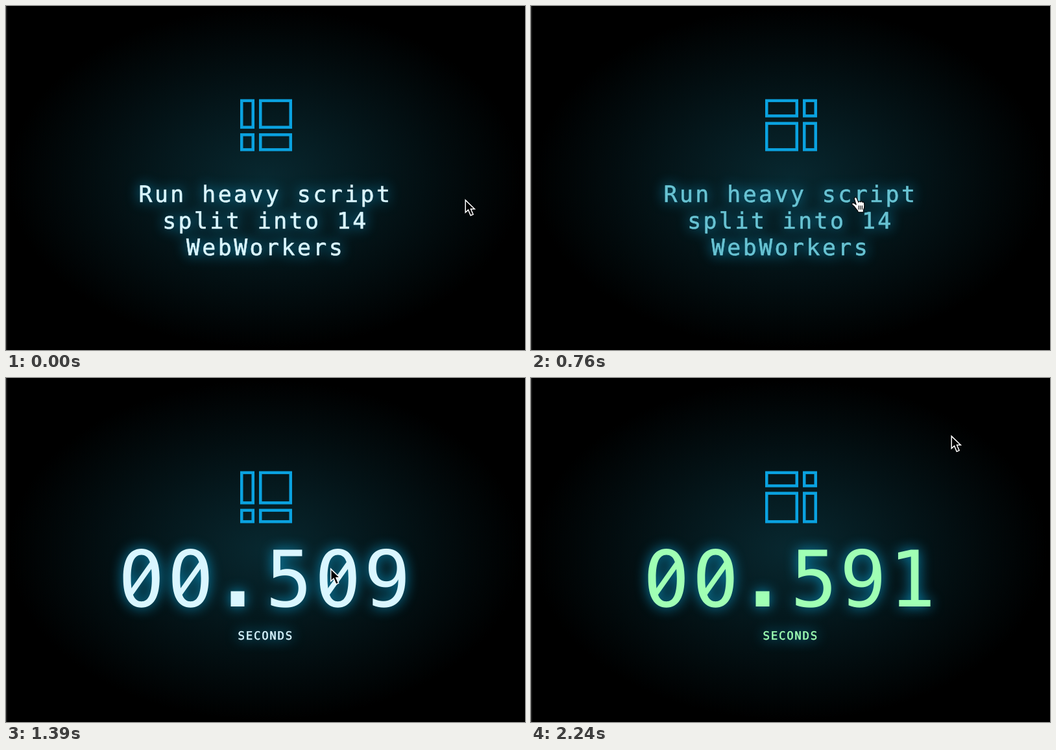
An HTML page for the animation above (2.27 s loop, 800x530 px).

```html
<!DOCTYPE html>
<html lang="en">
<head>
<meta charset="utf-8">
<title>Worker timer</title>
<style>
  html, body { margin: 0; width: 100%; height: 100%; overflow: hidden; background: #000; }
  svg { position: absolute; left: 0; top: 0; display: block; }
  #stage {
    position: relative; width: 800px; height: 530px; overflow: hidden;
    background: radial-gradient(ellipse at center, #082830 0%, #000 70%);
  }
  text { font-family: "DejaVu Sans Mono", monospace; white-space: pre; text-rendering: geometricPrecision; }
  #prompt text { font-size: 34.8px; letter-spacing: 3.48px; fill: currentColor; stroke: currentColor; stroke-width: 0.6px; }
  #digits text { font-size: 120px; }
  #label { font-size: 17.4px; letter-spacing: 1.74px; stroke: currentColor; stroke-width: 0.5px; }
</style>
</head>
<body>
<div id="stage">
<svg width="800" height="530" viewBox="0 0 800 530">
  <defs>
    <filter id="glow" filterUnits="userSpaceOnUse" x="0" y="0" width="800" height="530" color-interpolation-filters="sRGB">
      <feDropShadow dx="0" dy="0" stdDeviation="10" flood-color="#0aafe6" flood-opacity="0.8"/>
    </filter>
    <g id="zero">
      <path fill="currentColor" fill-rule="evenodd" d="M36 -89C54.5 -89 64 -73 64 -43.7S54.5 1.7 36 1.7S7.9 -14 7.9 -43.7S17.5 -89 36 -89ZM36 -79.6C25 -79.6 19.8 -68 19.8 -43.7S25 -7.7 36 -7.7S52.1 -19 52.1 -43.7S47 -79.6 36 -79.6Z"/>
      <path d="M16.5 -15.5L55.5 -70.5" stroke="currentColor" stroke-width="8"/>
    </g>
  </defs>
  <rect width="1.6" height="530" fill="#242424"/>
  <g id="icon" fill="none" stroke="#0aa2e0" stroke-width="4.5"></g>
  <g id="prompt" filter="url(#glow)">
    <text x="204.5" y="302.2">Run heavy script</text>
    <text x="241.2" y="342.9">split into 14</text>
    <text x="277.9" y="383.6">WebWorkers</text>
  </g>
  <g id="timer" filter="url(#glow)">
    <g id="digits"></g>
    <text id="label" x="357.5" y="402.6" fill="currentColor">SECONDS</text>
  </g>
  <g id="cursor">
    <path id="arrow" fill="#000" stroke="#fff" stroke-width="1.5" stroke-linejoin="miter"
      d="M0.7 1.6V20.6L5 16.6L8.7 25.3L12.6 23.6L9 15.3H14.8Z"/>
    <g id="hand" stroke="#000" stroke-linejoin="round" stroke-linecap="round">
      <path fill="#fff" stroke-width="1.1" d="M-1.5 5C-2.6 2.6 0.9 1.2 2.1 3.5L4.9 10C5 8 7.5 7.8 8 9.6C8.6 8 10.5 8.3 10.9 10C11.7 9 13.3 9.6 13.5 11.2C14.1 15 14 18.5 12.5 21L12.3 25.3H4.2L3.8 23.2C1.5 21 0 18.5 -1.5 16.5L-4.6 13.8C-6.4 11.7 -3.8 9.9 -1.7 11.6L1.2 13.6Z"/>
      <path fill="none" stroke-width="1.1" d="M5.2 15.2V20.7M7.8 15.2V20.7M10.4 15.2V20.7"/>
    </g>
  </g>
</svg>
</div>
<script>
const LOOP = 2270, START = 895, RESULT = 591;
const NS = "http://www.w3.org/2000/svg";
const $ = id => document.getElementById(id);
const clamp = p => Math.min(1, Math.max(0, p));
const span = (t, a, b) => clamp((t - a) / (b - a));
const mix = (a, b, p) => a + (b - a) * p;
const inOut = (p, n) => p < 0.5 ? Math.pow(2 * p, n) / 2 : 1 - Math.pow(2 - 2 * p, n) / 2;
const blend = (a, b, p) => `rgb(${a.map((v, i) => Math.round(mix(v, b[i], p)))})`;

const PALE = [218, 246, 255], HOVER = [104, 195, 211], GREEN = [160, 255, 180];

function add(parent, tag, attrs) {
  const el = document.createElementNS(NS, tag);
  for (const k in attrs) el.setAttribute(k, attrs[k]);
  parent.appendChild(el);
  return el;
}

// Steps of 30 ms, with two that last 40 ms
function snap(t) {
  const [from, last] = [[1430, 27], [460, 31], [0, 14]].find(s => t >= s[0]);
  return from + 30 * Math.min(last, Math.floor((t - from) / 30));
}

const cells = [0, 1, 2, 3].map(() => add($("icon"), "rect", {}));

// The crossing point of the four panes runs clockwise round a square
function drawIcon(t) {
  const u = t / 378 + 0.362, side = Math.floor(u) % 4;
  const p = inOut(u % 1, 3);
  const [px, py] = [[0, 1 - p], [p, 0], [1, p], [1 - p, 1]][side];
  const w = 22 + 29 * px, h = 22 + 29 * py, gap = 7, size = 80, line = 4.5;
  cells.forEach((cell, i) => {
    const right = i % 2, low = i > 1;
    cell.setAttribute("x", 361 + (right ? w + gap : 0) + line / 2);
    cell.setAttribute("y", 143.6 + (low ? h + gap : 0) + line / 2);
    cell.setAttribute("width", (right ? size - w - gap : w) - line);
    cell.setAttribute("height", (low ? size - h - gap : h) - line);
  });
}

const slots = [0, 1, 2, 3, 4, 5].map(i => {
  const x = 172.75 + 75.74 * i;
  if (i === 2) {
    add($("digits"), "rect", { x: 346.5, y: 328.5, width: 21, height: 23.5, fill: "currentColor" });
    return null;
  }
  return {
    zero: add($("digits"), "use", { href: "#zero", transform: `translate(${x} 352)` }),
    text: add($("digits"), "text", { x, y: 352, fill: "currentColor" })
  };
});

function drawTimer(t) {
  const on = t >= START;
  $("prompt").style.display = on ? "none" : "";
  $("timer").style.display = on ? "" : "none";
  if (!on) return;

  const ms = Math.min(RESULT, Math.max(0, Math.round(100 + (t - 1000) * 1.048)));
  const value = "00." + String(ms).padStart(3, "0");
  slots.forEach((slot, i) => {
    if (!slot) return;
    const isZero = value[i] === "0";
    slot.zero.style.display = isZero ? "" : "none";
    slot.text.textContent = isZero ? "" : value[i];
  });

  const grow = 1 - Math.pow(1 - span(t, START, START + 342), 3);
  $("digits").setAttribute("transform", `translate(0 ${309 * (1 - grow)}) scale(1 ${grow})`);
  $("digits").style.opacity = Math.pow(grow, 2.9);
  $("label").setAttribute("transform", `translate(0 ${-87 * (1 - grow)})`);
  $("label").style.opacity = Math.pow(grow, 1.3);
  $("timer").style.color = blend(PALE, GREEN, inOut(span(t, 1500, 1780), 2));
}

function drawCursor(t) {
  const come = inOut(span(t, 20, 420), 2), go = inOut(span(t, 1500, 1730), 2);
  const x = mix(mix(707.5, 500, come), 647.5, go);
  const y = mix(mix(297.5, 292.5, come), 88, go);
  const over = x < 600 && t < START;
  $("cursor").setAttribute("transform", `translate(${x} ${y})`);
  $("arrow").style.display = over ? "none" : "";
  $("hand").style.display = over ? "" : "none";
  $("prompt").style.color = blend(PALE, HOVER, span(t, 225, 420));
}

function draw(now) {
  const t = snap(now % LOOP);
  drawIcon(t);
  drawTimer(t);
  drawCursor(t);
}

let begin;
function tick(now) {
  if (begin === undefined) begin = now;
  draw(Math.max(0, now - begin));
  requestAnimationFrame(tick);
}
draw(0);
requestAnimationFrame(tick);
</script>
</body>
</html>
```
